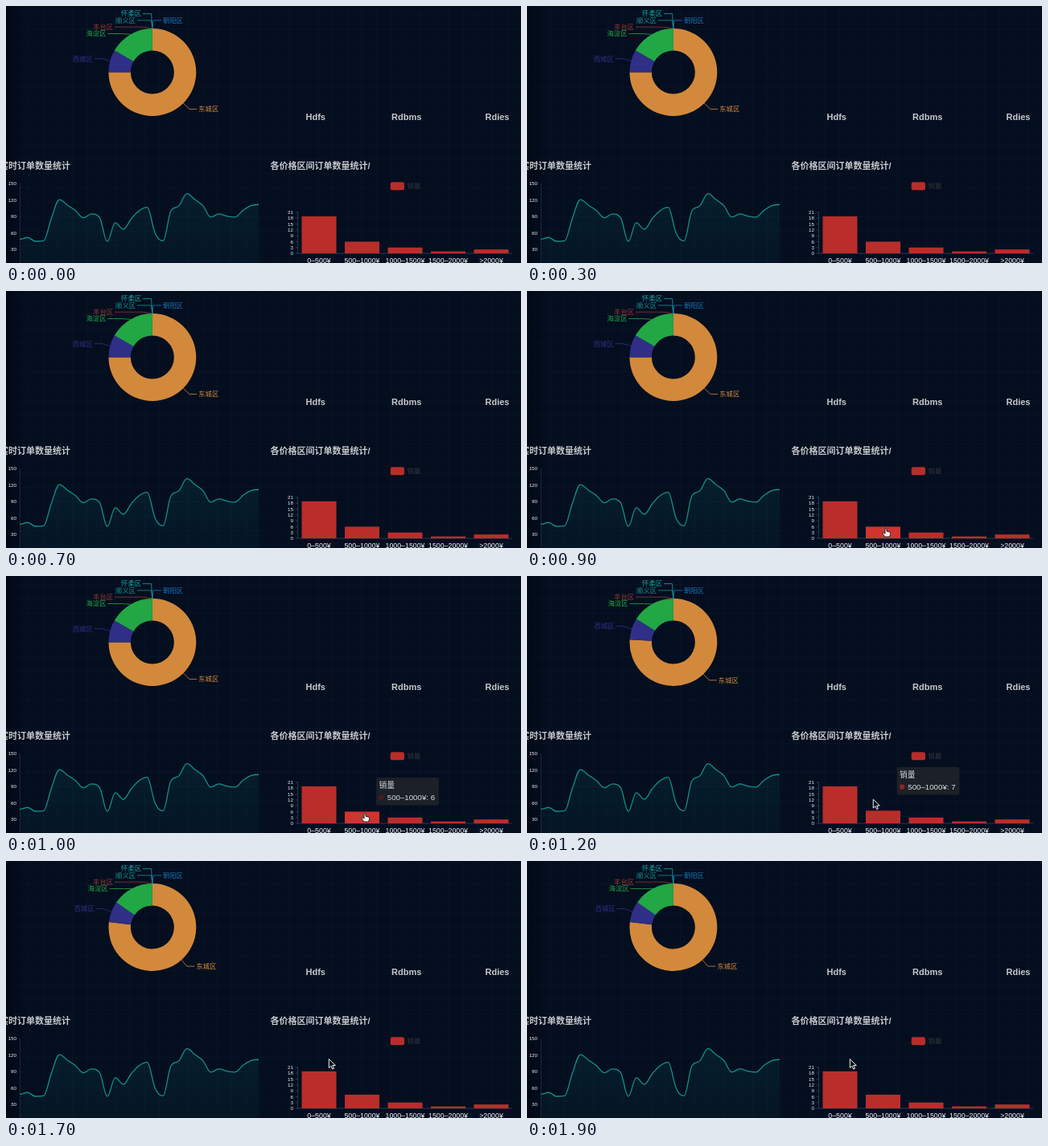
Recreate the animation shown at these times as an HTML page. Size 640 by 320 pixels, loop 2 s.

```html
<!DOCTYPE html>
<html lang="zh-CN">
<head>
<meta charset="utf-8">
<title>Dashboard</title>
<style>
html, body { margin: 0; width: 100%; height: 100%; overflow: hidden; background: #040e1f; }
svg { display: block; width: 100%; height: 100%; }
text { font-family: "Liberation Sans", "Noto Sans CJK SC", "Noto Sans CJK", sans-serif; }
.title { font-size: 11px; font-weight: bold; fill: #c6c9cc; }
.name { font-size: 11px; font-weight: bold; fill: #c6c9cc; }
.label { font-size: 8.3px; }
.tick { font-size: 6.2px; fill: #f2f4f6; text-anchor: end; }
.cat { font-size: 8.8px; fill: #f2f4f6; text-anchor: middle; }
.tip { font-size: 9.7px; fill: #dcdde0; }
</style>
</head>
<body>
<svg id="stage" viewBox="0 0 640 320">
  <defs>
    <pattern id="grid" width="18" height="18" patternUnits="userSpaceOnUse">
      <path d="M0 10.5H18M10.5 0V18" stroke="#11404f" stroke-opacity=".14" stroke-width=".8"/>
    </pattern>
    <linearGradient id="shade">
      <stop offset="0" stop-color="#01060f" stop-opacity=".6"/>
      <stop offset=".04" stop-color="#01060f" stop-opacity="0"/>
    </linearGradient>
    <linearGradient id="fill" x2="0" y2="1">
      <stop offset="0" stop-color="#12938c" stop-opacity=".12"/>
      <stop offset="1" stop-color="#12938c" stop-opacity=".05"/>
    </linearGradient>
  </defs>
  <rect width="640" height="320" fill="#040e1f"/>
  <rect width="640" height="320" fill="url(#grid)"/>
  <rect width="640" height="320" fill="url(#shade)"/>
</svg>
<script>
const NS = 'http://www.w3.org/2000/svg';
const stage = document.getElementById('stage');

function set(el, attrs) {
  for (const k in attrs) el.setAttribute(k, attrs[k]);
}
function add(tag, attrs, parent = stage) {
  const el = document.createElementNS(NS, tag);
  set(el, attrs);
  return parent.appendChild(el);
}
function text(str, x, y, cls, attrs = {}, parent = stage) {
  const el = add('text', { x, y, class: cls, ...attrs }, parent);
  el.textContent = str;
  return el;
}
const mix = (a, b, p) => a + (b - a) * p;
const progress = (t, from, span) => Math.min(Math.max((t - from) / span, 0), 1);
const cubicOut = p => 1 - (1 - p) ** 3;
const smooth = p => p * p * (3 - 2 * p);

// Headings
text('实时订单数量统计', -8, 203.2, 'title');
text('各价格区间订单数量统计/', 328.5, 203.2, 'title');
text('Hdfs', 372.5, 142.4, 'name');
text('Rdbms', 479, 142.4, 'name');
text('Rdies', 595.5, 142.4, 'name');

// Doughnut
const CX = 181.9, CY = 82.5, R = 54.4, HOLE = 27, ROW = 8.3;
const polar = (deg, r) => {
  const a = deg * Math.PI / 180;
  return [CX + r * Math.sin(a), CY - r * Math.cos(a)];
};
function ring(from, to) {
  const big = to - from > 180 ? 1 : 0;
  return `M${polar(from, R)}A${R} ${R} 0 ${big} 1 ${polar(to, R)}` +
    `L${polar(to, HOLE)}A${HOLE} ${HOLE} 0 ${big} 0 ${polar(from, HOLE)}Z`;
}

// A label with a leader that runs from the rim over a bend to the text.
function callout(str, color, side) {
  const line = add('polyline', { fill: 'none', stroke: color, 'stroke-width': .8 });
  const label = text(str, 0, 0, 'label', { fill: color, 'text-anchor': side < 0 ? 'end' : 'start' });
  return (deg, bendX, x, y) => {
    set(line, { points: [polar(deg, R), [bendX, y], [x - side * 2, y]].join(' ') });
    set(label, { x, y: y + 2.8 });
  };
}

// Empty slices share the top of the ring; their labels stack upwards.
const STACK = 34.5;
callout('丰台区', '#963a33', -1)(0, 170, 133, STACK - ROW);
callout('顺义区', '#17918f', -1)(0, 180.5, 161, STACK - 2 * ROW);
callout('怀柔区', '#17a5a0', -1)(0, 180.5, 168, STACK - 3 * ROW);
callout('朝阳区', '#1d74b4', 1)(0, 183, 195, STACK - 2 * ROW);

const slices = [['东城区', '#d3893b', 1], ['西城区', '#2f2f87', -1], ['海淀区', '#22a745', -1]]
  .map(([name, color, side]) => ({
    side,
    path: add('path', { fill: color }),
    note: callout(name, color, side)
  }));

function drawPie(orders) {
  const values = [orders, 1, 2];
  const total = orders + 3;
  let from = 0;
  slices.forEach(({ side, path, note }, i) => {
    const to = from + values[i] / total * 360;
    const mid = (from + to) / 2;
    const [x, y] = polar(mid, R + 10.5);
    set(path, { d: ring(from, to) });
    if (i === 2) note(mid, x - 5, x - 25, STACK);
    else note(mid, x, x + side * 11.5, y);
    from = to;
  });
}

// Smooth line chart: evenly spaced samples, flat at every turning point
const LEFT = 17, STEP = 9.9;
const orders = [
  49, 52, 45, 46, 88, 121, 111, 101, 88, 95, 89, 45, 79, 67, 86, 101,
  107, 60, 46, 101, 110, 132, 121, 110, 89, 95, 91, 89, 101, 110, 112
];
const px = i => LEFT + i * STEP;
const py = v => 221.3 + (150 - v) * .683;

function slope(list, i) {
  const before = list[i] - list[i - 1], after = list[i + 1] - list[i];
  if (!(before * after > 0)) return 0;
  const limit = 2.5 * Math.min(Math.abs(before), Math.abs(after));
  return Math.sign(after) * Math.min(Math.abs(before + after) / 2, limit);
}
function curve(list) {
  return list.reduce((d, v, i) => {
    if (!i) return `M${px(0)} ${py(v)}`;
    const a = list[i - 1] + slope(list, i - 1) * .38, b = v - slope(list, i) * .38;
    return d + `C${px(i - .62)} ${py(a)} ${px(i - .38)} ${py(b)} ${px(i)} ${py(v)}`;
  }, '');
}
const wave = curve(orders);
add('path', { d: wave + `V320H${LEFT}Z`, fill: 'url(#fill)' });
add('path', { d: 'M17.5 221V320', stroke: '#1d3044', 'stroke-width': .8 });
add('path', { d: wave, fill: 'none', stroke: '#12908a', 'stroke-width': 1.3 });
for (let v = 150; v >= 30; v -= 30) text(v, 13, py(v) + 1.8, 'tick');

// Bar chart
const BASE = 308, UNIT = 51 / 21;
add('rect', { x: 477.7, y: 219.2, width: 17.3, height: 10, rx: 2.5, fill: '#b82d2a' });
text('销量', 498.5, 227.3, 'label', { fill: '#33333a' });
for (let v = 0; v <= 21; v += 3) {
  const y = BASE - v * UNIT;
  text(v, 357, y + 2.2, 'tick');
  add('path', { d: `M360 ${y}H362.5`, stroke: '#35516e', 'stroke-width': .7 });
}
add('path', { d: 'M362.5 256V308H629', fill: 'none', stroke: '#2b4560', 'stroke-width': .8 });

function setBar(bar, value, fill) {
  set(bar, { y: BASE - value * UNIT, height: value * UNIT, fill });
}
const RED = '#b92e2b';
const sales = { '0–500¥': 19, '500–1000¥': 6, '1000–1500¥': 3, '1500–2000¥': 1, '>2000¥': 2 };
const bars = Object.entries(sales).map(([range, value], i) => {
  const x = 367.5 + i * 53.5;
  text(range, x + 21.5, 320.3, 'cat');
  const bar = add('rect', { x, width: 43 });
  setBar(bar, value, RED);
  return bar;
});

// Tooltip and pointer
const tip = add('g', {});
add('rect', { width: 78, height: 34.5, rx: 3, fill: '#1e2128', 'fill-opacity': .95 }, tip);
text('销量', 3.6, 13.3, 'tip', {}, tip);
const dot = add('circle', { cx: 6.5, cy: 24.5, r: 3.2 }, tip);
const tipText = text('', 13.8, 28, 'tip', {}, tip);

const arrow = add('path', {
  d: 'M0 0V11L2.6 8.7 4.4 12.6 6.2 11.8 4.5 8H8Z',
  fill: '#101216', stroke: '#f0f0f0', 'stroke-width': 1
});
const hand = add('path', {
  d: 'M-1 1Q0-.8 1 1V4.2L4.8 5.2Q6 5.7 5.6 7.5L4.5 11H-1.2L-4.2 7Q-4.2 5.4-2.6 6L-1 7.2Z',
  fill: '#f4f4f4', stroke: '#181818', 'stroke-width': .9
});
const show = (el, on) => set(el, { visibility: on ? 'visible' : 'hidden' });
const move = (el, x, y) => set(el, { transform: `translate(${x} ${y})` });

function draw(time) {
  const t = Math.floor(time / 100) * 100;
  const p = cubicOut(progress(t, 1100, 500));
  const hover = t >= 900 && t < 1200;
  drawPie(mix(9, 10, p));
  setBar(bars[1], mix(6, 7, p), hover ? '#cf3431' : RED);

  const go = smooth(progress(t, 1000, 500));
  const x = mix(446, 401.3, go), y = mix(295, 246.5, go);
  move(hand, x, y);
  move(arrow, x, y);
  show(hand, hover);
  show(arrow, t >= 1200);

  move(tip, 459.5, y - 40);
  if (t < 1200) move(tip, 460, y - 44);
  show(tip, t >= 1000 && t < 1300);
  set(dot, { fill: hover ? '#4c1b20' : '#852829' });
  tipText.textContent = `500–1000¥: ${hover ? 6 : 7}`;
}

const start = performance.now();
function tick(now) {
  draw(Math.max(now - start, 0) % 2000);
  requestAnimationFrame(tick);
}
draw(0);
requestAnimationFrame(tick);
</script>
</body>
</html>
```
